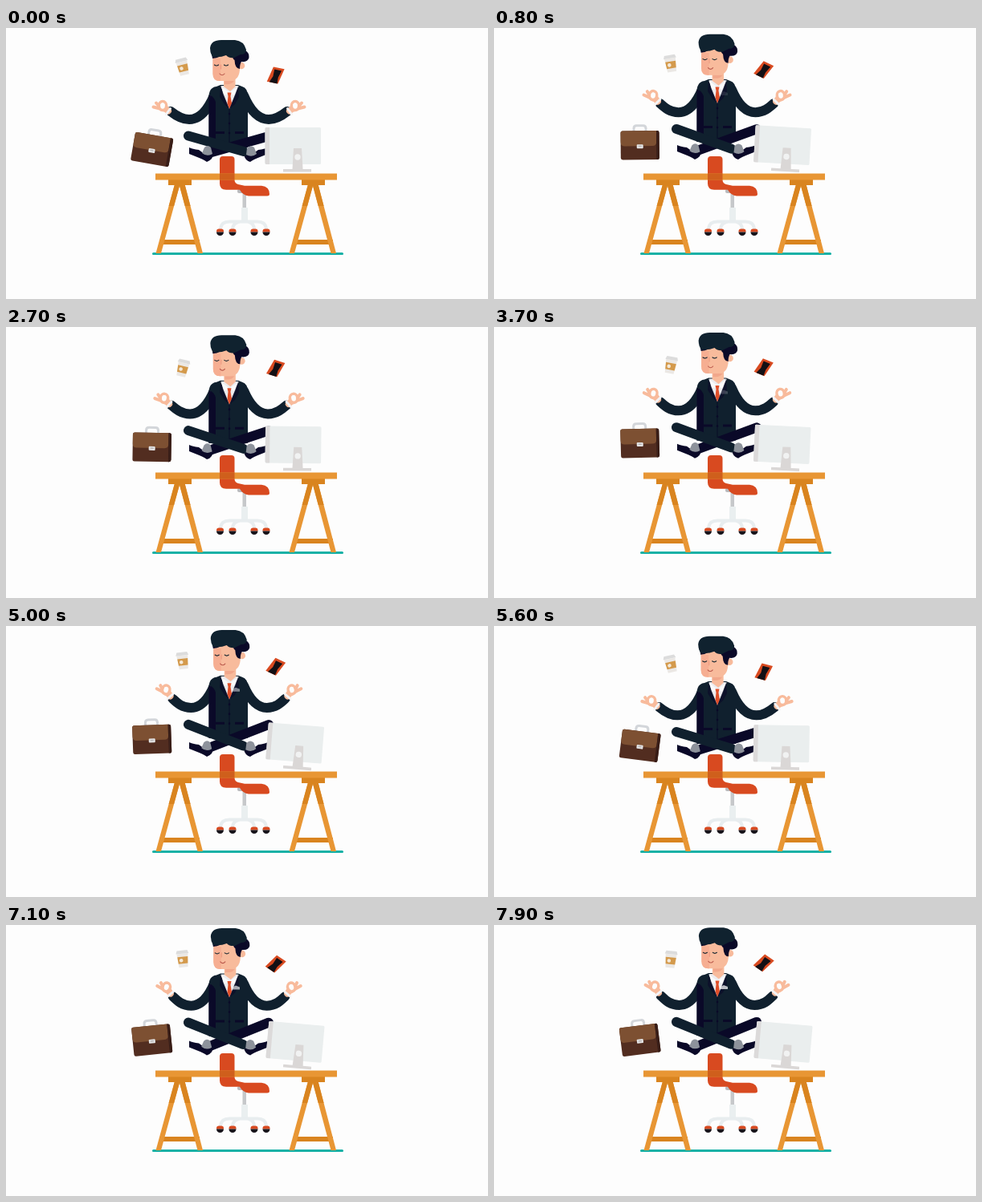
An HTML page that plays this animation: 600 px wide and 338 px high, repeating every 8 s.

```html
<!DOCTYPE html>
<html lang="en">
<head>
<meta charset="utf-8">
<title>Desk meditation</title>
<style>
  html, body { margin: 0; width: 100%; height: 100%; overflow: hidden; background: #fdfdfd; }
  svg { display: block; width: 100vw; height: 100vh; }
  .line { fill: none; stroke-linecap: round; stroke-linejoin: round; }
  .suit { fill: #10202e; }
  .suit-line { stroke: #10202e; }
  .night { fill: #0a0928; }
  .night-line { stroke: #0a0928; }
  .skin { fill: #f8bb9c; }
  .skin-line { stroke: #f8bb9c; }
  .wood { fill: #e89634; }
  .wood-dark { fill: #d9841f; }
  .red { fill: #d84a20; }
</style>
</head>
<body>
<svg viewBox="0 0 600 338">
  <defs>
    <g id="trestle">
      <rect class="wood-dark" x="191" y="264" width="50" height="6"/>
      <path class="wood" d="M210 195h6.500L193 281h-6.500zM215.500 195h7L245 281h-6.500z"/>
      <path class="wood-dark" d="M210 195h6.500L209.100 222H202.600zM215.500 195h7L229.600 222H222.700z"/>
      <rect class="wood-dark" x="202" y="189" width="29" height="7"/>
    </g>
    <g id="caster">
      <path class="red" d="M-4.500 0V-1Q-4.500 -4 -1.500 -4H1.500Q4.500 -4 4.500 -1V0Z"/>
      <path fill="#17141b" d="M-4.500 0A4.500 4.500 0 0 0 4.500 0Z"/>
    </g>
    <path id="shoe" class="night" d="M228 149Q232 151 240 152L247 157L258 157Q257 165 250 167Q246 164 238 161L228 157Z"/>
  </defs>

  <!-- chair -->
  <rect x="294.500" y="204" width="4.500" height="22" fill="#c6c8ca"/>
  <rect x="288" y="201" width="11" height="5" rx="2" fill="#b9babd"/>
  <rect x="293" y="224" width="8" height="19" fill="#eaeff0"/>
  <path class="line" stroke="#e8edef" stroke-width="4" d="M267 250Q268 241.500 278 241.500H313Q323 241.500 324 250M282 250Q283 243 291 241.500M309 250Q308 243 301 241.500"/>
  <use href="#caster" x="266.500" y="254.500"/>
  <use href="#caster" x="282" y="254.500"/>
  <use href="#caster" x="309" y="254.500"/>
  <use href="#caster" x="324" y="254.500"/>
  <path class="red" d="M266 164Q266 160 270 160H280.500Q284.500 160 284.500 164V190Q285 194 289 195L297 196.800H318Q328 198 328 207Q328 209.500 325 209.500H302Q295 209 291 201.800H274Q266 201.500 266 194Z"/>

  <!-- desk -->
  <rect x="182" y="280" width="238" height="3" rx="1.500" fill="#18b1a6"/>
  <use href="#trestle"/>
  <use href="#trestle" x="166"/>
  <rect class="wood" x="186" y="181.500" width="226" height="8"/>
  <rect x="266" y="181.500" width="18.500" height="8" fill="#cf5f1c"/>

  <!-- man -->
  <path id="arm" class="line suit-line" stroke-width="12"/>
  <g id="hand">
    <path class="line skin-line" stroke-width="8" d="M-1.500 -1L-5 -4"/>
    <path class="line skin-line" stroke-width="4" d="M-7 -2L-12 -4L-20 -6M-11 -5L-16.500 -11"/>
    <ellipse class="line skin-line" cx="-8.500" cy="-7.500" rx="4.600" ry="5.400" stroke-width="3.600"/>
    <ellipse cx="-8.500" cy="-7.500" rx="2.900" ry="3.700" fill="#fdfdfd"/>
    <path class="line" stroke="#f4f4f6" stroke-width="3" d="M-4 3L1 -4"/>
  </g>
  <g transform="matrix(-1 0 0 1 555 0)">
    <use href="#arm"/>
    <use href="#hand"/>
  </g>
  <g id="torso">
    <path class="suit" d="M252.500 149V85Q253 74 262 73L267 71H289L294 73Q301 75 301 85V149Z"/>
    <path class="night" d="M252.500 84Q258 84 261 92V149H252.500Z"/>
    <path fill="#ececef" d="M268 72L289 72L286 82L278 101L270 82Z"/>
    <path fill="#fafafb" d="M267 72L278 81L272 84ZM290 72L278 81L284 84Z"/>
    <path fill="#e04f2a" d="M275.500 80.500H280.500L279.500 85L281 94L278 101L275.500 94L276.500 85Z"/>
    <path class="night" d="M267 73L278 101L272 95L266 86ZM289 73L278 101L285 95L290 86Z" opacity=".65"/>
    <path class="line night-line" stroke-width=".8" d="M278 101V146"/>
    <g class="night">
      <circle cx="278" cy="107" r="1.300"/>
      <circle cx="278" cy="119" r="1.300"/>
      <circle cx="278" cy="131" r="1.300"/>
      <path d="M261 129H272V132H261ZM285 129H296V132H285Z"/>
    </g>
    <path id="hanky" fill="#f4f4f6" d="M282 88L286 86L291 88V91H282Z"/>
  </g>
  <g id="head">
    <path class="skin" d="M271 58H285.500V73L279 79L271 73Z"/>
    <path fill="#f1a78b" d="M272 66H284Q281 71 272 70Z"/>
    <circle class="skin" cx="293" cy="47" r="4.300"/>
    <path class="skin" d="M257.500 31H291V52Q290 66 278 66H266Q257.500 66 257.500 57Z"/>
    <path fill="#f6ae92" d="M257.500 38H267V66H266Q257.500 66 257.500 57Z"/>
    <path class="night" d="M256 30H270Q268 37 257 38ZM281 28H298Q303 31 302.500 37Q301 43 293 42Q291 45 291 51Q285 51 284.500 40Q281 38 281 28Z"/>
    <path fill="#10222f" d="M257 36Q254 31 254 25Q255 15 268 15H285Q296 16 299 27Q299 33 292 33L284 37Q278 38 274 34Q267 37 257 36Z"/>
    <path class="line" stroke="#142530" stroke-width="1.200" d="M259.500 46Q262 48 264.500 46M271.500 46Q274 48 276.500 46"/>
    <path class="line" stroke="#ee9c82" stroke-width="1.200" d="M267.500 46V51"/>
    <path class="line" stroke="#b9584b" stroke-width="1.100" d="M266 57Q269 60.500 272 57"/>
  </g>
  <g id="feet">
    <use href="#shoe"/>
    <use href="#shoe" transform="matrix(-1 0 0 1 554 0)"/>
  </g>
  <path id="backLeg" class="line night-line" stroke-width="12"/>
  <path id="frontLeg" class="line suit-line" stroke-width="12"/>
  <g id="socks" fill="#8d929b">
    <path d="M300 150Q304 145 309 149L312 157Q306 162 299 158Z"/>
    <path d="M255 149Q251 145 247 149L244 156Q250 161 257 157Z"/>
  </g>

  <!-- floating things -->
  <g id="bag">
    <path class="line" stroke="#d3d6da" stroke-width="3" d="M-7.500 -18V-21Q-7.500 -24.500 -4 -24.500H4Q7.500 -24.500 7.500 -21V-18"/>
    <rect x="-24" y="-18" width="48" height="36" rx="2.500" fill="#522d20"/>
    <path fill="#7d5032" d="M-24 -15.500Q-24 -18 -21.500 -18H20.500V-4Q20.500 1 15.500 1H-19Q-24 1 -24 -4Z"/>
    <path fill="#381d17" d="M20.500 -18H21.500Q24 -18 24 -15.500V15.500Q24 18 21.500 18H20.500Z"/>
    <rect x="-4" y="-1" width="8" height="5" rx="1" fill="#e3e3e4"/>
    <rect x="-2" y=".5" width="4" height="1.500" fill="#b8b5b5"/>
  </g>
  <g id="cup">
    <path fill="#ebe8e5" d="M-7 -6.500H7L5.500 10.500H-5.500Z"/>
    <path fill="#d49a4c" d="M-6.500 -2.500H6.500L5.800 6H-5.800Z"/>
    <circle cx="-2" cy="1.800" r="2.300" fill="#f4e9d8"/>
    <path fill="#dcdcdc" d="M-6.500 -10.500H6.500L8 -6.500H-8Z"/>
  </g>
  <g id="frame">
    <g transform="skewX(-12)">
      <rect class="red" x="-7" y="-9.800" width="14" height="19.600"/>
      <path fill="#131015" d="M-4.500 -7H4.500L4 2L6 9.800H-4L-2.500 2Z"/>
    </g>
  </g>
  <g id="screen">
    <rect x="322.500" y="124" width="69.500" height="46" rx="1.500" fill="#eaeeee"/>
    <path fill="#dcdada" d="M324 124H328V170H324Q322.500 170 322.500 168V126Q322.500 124 324 124Z"/>
    <path fill="#dad7d6" d="M358 150H368L369.500 176H380V179.500H345V176H356.500Z"/>
    <circle cx="363" cy="161" r="3.700" fill="#f1f2f2"/>
  </g>
</svg>
<script>
  const LOOP = 8000, STEP = 100, BEAT = 1500;
  const $ = id => document.getElementById(id);
  const mix = (a, b, k) => a + (b - a) * k;
  const move = (id, value) => $(id).setAttribute('transform', value);

  // Values at four successive beats, joined by cosine easing.
  function sway(keys, t) {
    const beat = Math.floor(t / BEAT);
    const k = (1 - Math.cos(Math.PI * (t / BEAT - beat))) / 2;
    return mix(keys[beat % 4], keys[(beat + 1) % 4], k);
  }

  // Blends two paths that share the same commands.
  function bend(id, low, high, k) {
    const goal = high.split(' ');
    const d = low.split(' ').map((s, i) => isNaN(s) ? s : mix(+s, +goal[i], k));
    $(id).setAttribute('d', d.join(' '));
  }

  function float(id, x, ys, angles, t) {
    move(id, `translate(${x} ${sway(ys, t)}) rotate(${sway(angles, t)})`);
  }

  function pose(t) {
    const rise = sway([0, 1, .28, 1], t);

    move('head', `translate(${rise} ${-13.3 * rise})`);
    move('torso', `translate(0 ${-12.5 * rise})`);
    $('hanky').setAttribute('opacity', Math.max(0, 2 * rise - 1));
    bend('arm', 'M 259 84 C 253 98 243 114 228 114 C 218 114 210 108 205 104',
                'M 259 71 C 253 85 245 98 231 98 C 219 98 213 91 208 86', rise);
    move('hand', `translate(${mix(203.5, 206.5, rise)} ${mix(104.5, 83.5, rise)}) rotate(${18 * rise})`);

    bend('backLeg', 'M 327 135 L 256 155', 'M 327 119 L 254 150', rise);
    bend('frontLeg', 'M 227 134.500 L 296 154', 'M 227 119 L 295 148', rise);
    move('feet', `translate(0 ${-5.5 * rise})`);
    move('socks', `translate(${-rise} ${-5 * rise})`);

    float('bag', 181.7, [151.5, 142, 150.7, 138], [10, -9, 2, -6], t);
    float('frame', 335.7, [59, 46.5, 52, 48], [12, 38, 16, 30], t);
    const tilt = -14 * Math.cos(Math.PI * t / (2 * BEAT));
    move('cup', `translate(220 ${sway([48.3, 41, 52.3, 41.5], t)}) rotate(${tilt})`);
    const lean = sway([0, 1, 0, 1], t);
    move('screen', `translate(0 ${-lean}) rotate(${6 * lean} 362 178)`);
  }

  const start = performance.now();
  function tick() {
    const t = (performance.now() - start) % LOOP;
    pose(Math.floor(t / STEP) * STEP);
    requestAnimationFrame(tick);
  }
  tick();
</script>
</body>
</html>
```
